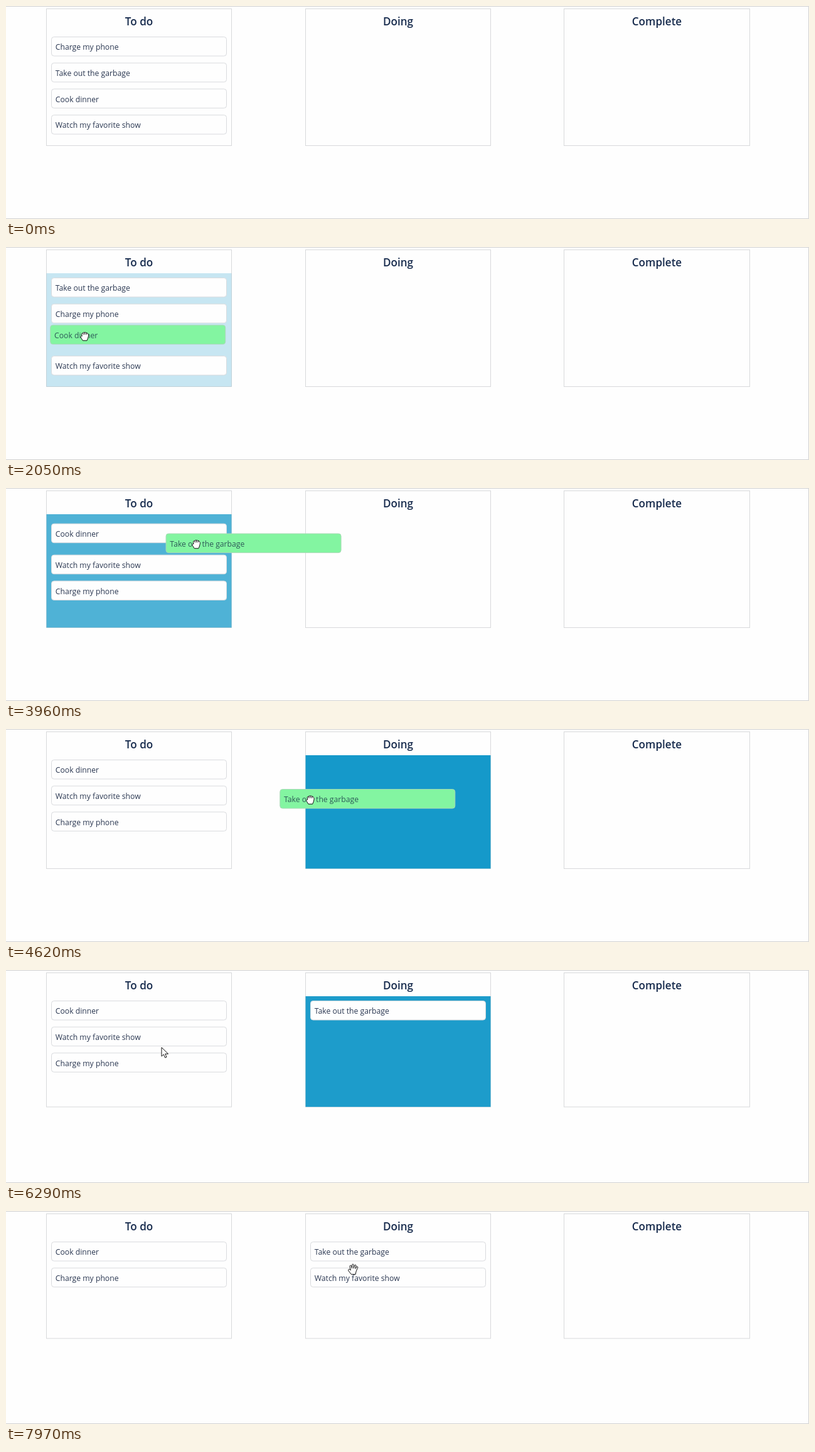
Animation of 1280 by 341 pixels, one loop 8000 ms. Source, as an HTML page:

```html
<!DOCTYPE html>
<html lang="en">
<head>
<meta charset="utf-8">
<title>Task board</title>
<style>
  html, body { margin: 0; width: 100%; height: 100%; overflow: hidden; background: #fefefe; }
  svg { display: block; width: 1280px; height: 341px; }
  text { font-family: "Open Sans", "Noto Sans", sans-serif; }
  .title { font-size: 17.1px; font-weight: 600; fill: #172b4d; text-anchor: middle; }
  .label { font-size: 12.2px; fill: #2b3852; }
  .card rect { fill: #fefefe; stroke: #d9dbde; }
  .held rect { fill: #83f5a1; stroke: #a9d9b6; }
  .held .label { fill: #2d5a58; }
  .cursor path { fill: #fff; stroke: #111; stroke-linejoin: round; stroke-linecap: round; }
</style>
</head>
<body>
<svg id="stage" viewBox="0 0 1280 341"></svg>
<script>
const LOOP = 8000, ENTER = 340, FADE = 320, SHIFT = 200, REST = 180;
const TOP = 49, PITCH = 41.7;
const stage = document.getElementById('stage');

function add(parent, tag, attrs = {}, text = '') {
  const el = document.createElementNS(stage.namespaceURI, tag);
  for (const key in attrs) el.setAttribute(key, attrs[key]);
  el.textContent = text;
  return parent.appendChild(el);
}

function bezier(x1, y1, x2, y2) {
  const at = (a, b, s) => 3 * a * s * (1 - s) ** 2 + 3 * b * s * s * (1 - s) + s ** 3;
  return x => {
    if (x <= 0) return 0;
    if (x >= 1) return 1;
    let lo = 0, hi = 1;
    for (let i = 0; i < 24; i++) {
      const mid = (lo + hi) / 2;
      if (at(x1, x2, mid) < x) lo = mid; else hi = mid;
    }
    return at(y1, y2, lo);
  };
}
const ease = bezier(.25, .1, .25, 1);
const shiftEase = bezier(.2, 0, 0, 1);
const dropEase = bezier(.2, 1, .1, 1);
const mix = (a, b, k) => a.map((v, i) => v + (b[i] - v) * k);

const columns = ['To do', 'Doing', 'Complete'].map((name, i) => ({
  name, x: Math.round(64 + 412.6 * i), right: 359 + 413 * i, list: [], spans: []
}));
const place = (col, slot) => [col.x + 8, TOP + slot * PITCH];

const cards = ['Charge my phone', 'Take out the garbage', 'Cook dinner', 'Watch my favorite show']
  .map((name, slot) => ({ name, slot, home: place(columns[0], slot), steps: [] }));
columns[0].list = [...cards];
const [charge, garbage, dinner, show] = cards;

// Points are [time, x, y]; "path" starts at the grab and ends at the release
const drags = [
  { card: charge, end: 1700, path: [[1130, 125, 67], [1420, 126, 105]] },
  { card: dinner, end: 2560, path: [[1996, 127, 150.5], [2240, 119, 116]] },
  { card: show, end: 3500, path: [[3010, 117, 200], [3130, 117, 156]] },
  { card: garbage, end: 6274, after: [[6290, 248, 124]],
    path: [[3740, 120.5, 66], [4180, 484, 113], [4620, 484, 113], [5140, 889.5, 134],
      [5330, 945, 132], [5900, 545, 95]] },
  { card: show, end: 7570, after: [[7580, 306, 100], [7960, 553, 93]],
    path: [[6722, 126, 108], [7200, 505, 108]] }
];

// The pointer drags at steady speed and glides softly in between
const route = [{ t: ENTER, pos: [344, 322], soft: true }];
const visit = ([t, ...pos], soft) => route.push({ t, pos, soft });
for (const drag of drags) {
  const [t, ...grip] = drag.path[0];
  drag.grab = t;
  drag.release = drag.path[drag.path.length - 1][0];
  visit([t - REST, ...grip], true);
  drag.path.forEach(point => visit(point, false));
  (drag.after || []).forEach(point => visit(point, true));
}

function pointer(t) {
  const i = route.findIndex(key => key.t > t);
  if (i === 0) return route[0].pos;
  if (i < 0) return route[route.length - 1].pos;
  const a = route[i - 1], b = route[i], u = (t - a.t) / (b.t - a.t);
  return mix(a.pos, b.pos, b.soft ? u * u * (3 - 2 * u) : u);
}

function locate(card, t) {
  let pos = card.home, held = false, dragging = false;
  for (const { start, goal, drag } of card.steps) {
    if (t < start) break;
    if (!drag) {
      pos = mix(pos, goal, shiftEase((t - start) / SHIFT));
      continue;
    }
    const from = pointer(start), to = pointer(Math.min(t, drag.release));
    pos = pos.map((v, i) => v + to[i] - from[i]);
    dragging = t < drag.release;
    held = t < drag.end;
    if (!dragging) pos = mix(pos, drag.goal, dropEase((t - drag.release) / (drag.end - drag.release)));
  }
  return { pos, held, dragging };
}

// Play one drag through the board, noting which columns light up and which cards make room
function play(drag) {
  const { card, grab, release, end } = drag;
  const source = columns.find(col => col.list.includes(card));
  source.list.splice(source.list.indexOf(card), 1);
  card.steps.push({ start: grab, drag });
  let over = null, index = 0;
  for (let t = grab; t < release; t += 2) {
    const [x, y] = locate(card, t).pos;
    const next = columns.find(col => Math.abs(x - col.x - 8) < 140) || null;
    if (next !== over) {
      if (over) over.spans[over.spans.length - 1][1] = t;
      if (next) next.spans.push([t, end]);
      over = next;
    }
    if (over) index = Math.min(over.list.length, Math.max(0, Math.floor((y - TOP) / PITCH + .65)));
    for (const col of columns) {
      col.list.forEach((other, i) => {
        const slot = i + (col === over && i >= index ? 1 : 0);
        if (slot !== other.slot) other.steps.push({ start: t, goal: place(col, slot) });
        other.slot = slot;
      });
    }
  }
  over.list.splice(index, 0, card);
  card.slot = index;
  drag.goal = place(over, index);
  if (over !== source) drag.moved = true;
}
drags.forEach(play);
const shrinkAt = drags.find(drag => drag.moved).end;

add(stage, 'rect', { width: 1280, height: 341, fill: '#fefefe' });
add(stage, 'path', { d: 'M0 .5H1279.5V340.5H0', fill: 'none', stroke: '#d0d0d0' });
for (const col of columns) {
  const width = col.right - col.x;
  col.frame = add(stage, 'rect', { x: col.x + .5, y: 4.5, width, fill: 'none', stroke: '#d8d9db' });
  col.fill = add(stage, 'rect', { x: col.x + .5, y: 42, width, fill: '#1599ca' });
  add(stage, 'text', { x: (col.x + col.right + 1) / 2, y: 30.5, class: 'title' }, col.name);
}
const layer = add(stage, 'g');
for (const card of cards) {
  card.el = add(layer, 'g');
  add(card.el, 'rect', { x: .5, y: .5, width: 279, height: 30.5, rx: 4 });
  add(card.el, 'text', { x: 6.8, y: 21.2, class: 'label' }, card.name);
}

const cursor = add(stage, 'g', { class: 'cursor' });
const shapes = {
  arrow: 'M0 .3V14.2L3.3 11.2L5.6 16.4L8 15.4L5.8 10.3H10.2Z',
  open: 'M-3 8L-7 2.8Q-8 .6-6.2.1Q-5 0-3.5 2L-4.9-4Q-5-6-3.8-6Q-2.7-6-2.3-4.5L-1.5-1.2L-1.4-6.5'
    + 'Q-1.2-8 0-8Q1-8 1.1-6.5L1.3-1.2L2.6-5.8Q3-7 4-6.8Q5.2-6.5 4.9-5L4-.6L5.8-3.5'
    + 'Q6.8-4.5 7.5-3.8Q8.2-3 7.5-2L5 4L4.2 8Z',
  closed: 'M-3 6.8L-5.6 2.6Q-6.8.4-5-.3L-4 .2L-4.6-3Q-4.5-5-2.8-4.8Q-2-6.6 0-5.8Q1.5-6.8 2.8-5.2'
    + 'Q5-5.6 5.2-3.5Q7-3 6.2 0Q5.8 3 4 6.8ZM-2-4.6V-2.6M.4-5.4V-2.8M2.9-4.8V-2.6'
};
for (const key in shapes) shapes[key] = add(cursor, 'path', { d: shapes[key] });

function render(t) {
  const bottom = Math.max(204, 223.5 - PITCH * shiftEase((t - shrinkAt) / SHIFT));
  for (const col of columns) {
    const levels = col.spans.map(([on, off]) => ease((t - on) / FADE) * (1 - ease((t - off) / FADE)));
    col.fill.setAttribute('height', bottom - 42);
    col.fill.setAttribute('opacity', Math.max(0, ...levels));
    col.frame.setAttribute('height', bottom - 4.5);
  }

  const [px, py] = pointer(t);
  let mode = 'arrow', top = null;
  for (const card of cards) {
    const { pos: [x, y], held, dragging } = locate(card, t);
    card.el.setAttribute('transform', `translate(${x} ${y})`);
    card.el.setAttribute('class', held ? 'card held' : 'card');
    if (held) top = card.el;
    if (dragging) mode = 'closed';
    else if (mode === 'arrow' && px > x && px < x + 280 && py > y && py < y + 31) mode = 'open';
  }
  if (top && layer.lastChild !== top) layer.appendChild(top);

  cursor.setAttribute('visibility', t < ENTER ? 'hidden' : 'visible');
  cursor.setAttribute('transform', `translate(${px} ${py})`);
  for (const key in shapes) shapes[key].setAttribute('display', key === mode ? 'inline' : 'none');
}

const began = performance.now();
function tick() {
  render((performance.now() - began) % LOOP);
  requestAnimationFrame(tick);
}
tick();
</script>
</body>
</html>
```
